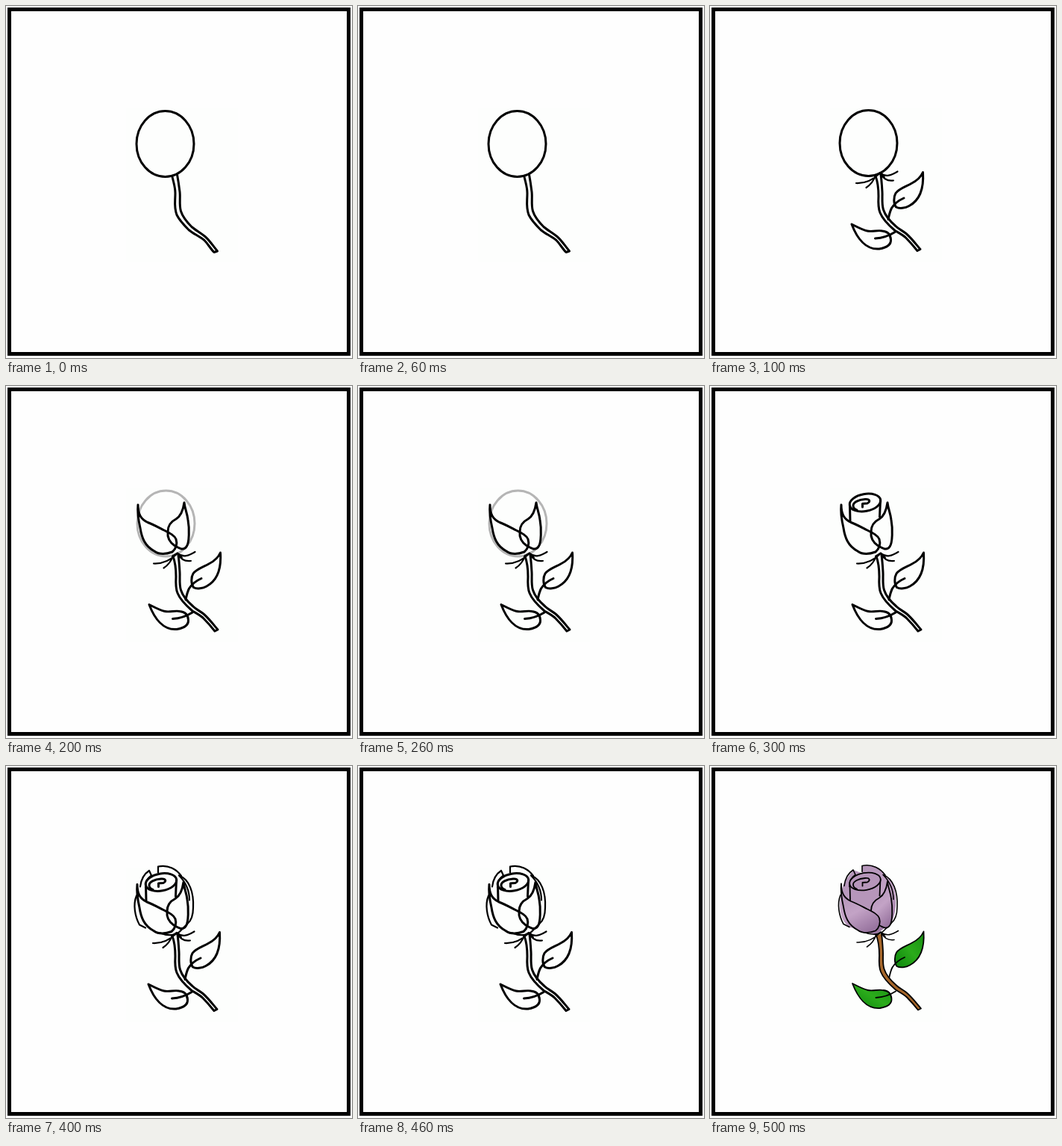
An HTML page that plays this animation: 464 px wide and 471 px high, repeating every 600 ms.

```html
<!DOCTYPE html>
<html lang="en">
<head>
<meta charset="utf-8">
<title>Balloon to rose</title>
<style>
  html, body { margin: 0; width: 100%; height: 100%; overflow: hidden; background: #fefefe; }
  svg { display: block; }
  #art { fill: none; stroke: #000; stroke-width: 3; stroke-linejoin: round; stroke-linecap: round; }
  .thin { stroke-width: 2.2; }
  .faded { stroke: #b5b5b5; }
  #art.painted { stroke-width: 1.8; }
  .painted .thin { stroke-width: 1.6; }
  .painted .leaf { fill: url(#green); }
  .painted .stem { fill: #a5662a; }
  .painted .petal { fill: url(#lilac); }
  .painted .bud { fill: #b696ba; }
</style>
</head>
<body>
<svg width="464" height="471">
  <defs>
    <linearGradient id="lilac" x1=".2" y1="0" x2=".65" y2="1">
      <stop offset="0" stop-color="#b192b6"/>
      <stop offset=".55" stop-color="#c3a3c6"/>
      <stop offset="1" stop-color="#98749f"/>
    </linearGradient>
    <linearGradient id="green" x1="0" y1="1" x2="1" y2="0">
      <stop offset="0" stop-color="#0b850c"/>
      <stop offset=".5" stop-color="#2bab1b"/>
      <stop offset="1" stop-color="#178f12"/>
    </linearGradient>
  </defs>
  <rect x="4.5" y="4.5" width="455" height="461" fill="none" stroke="#000" stroke-width="5"/>
  <rect x="161" y="136" width="150" height="207" fill="#fdfefd"/>
  <g id="art">
    <ellipse id="balloon" data-from="0" data-to="2" cx="213.5" cy="184" rx="38.5" ry="44"/>
    <path data-from="0" data-to="0" d="M223 228C225 237 227 242 227 250C227 262 225 268 229 279C233 287 239 293 245 299C252 305 259 307 266 313C271 318 274 324 279 329L283.500 327.500C278 321 273 313 267 308C261 303 255 300 249 295C243 289 237 282 234.500 274C232 266 234 256 233 248C232 240 231 233 229.500 225"/>

    <g data-from="1">
      <path class="leaf" d="M286.500 223C283 231 277 235 271 238C264 242 254 245 250 251C247 256 247 265 250.500 269.500C255 272 263 271 268 268C283 260 288 245 286.500 223Z"/>
      <path class="leaf" d="M191 292.500C198 296 205 300 212 301.500C219 303 226 300 232 301.500C239 302 243 306 243.500 313C244 320 237 324 228 325.500C210 327 198 311 191 292.500Z"/>
      <path d="M261 257.500C253 261 247 267 244.500 271C242 276 241 281 240 286M222.500 311.500C232 311 241 308 249 303"/>
      <path class="stem" d="M223 228C226 236 227 246 227 255C226.500 264 226.500 271 229 277C233 287 242 295 249 301C254 304 260 307 264 311C270 317 275 323 279 328L283 326C277 319 271 311 264 305C259 301 254 299 250 295C243 289 236 281 233.500 273C231 265 232.500 256 232 249C231.500 240 231 233 230 226"/>
      <path class="thin" d="M229 224C218 235 208 238 197 237.500M223 227C220 236 216 240 210.500 243.500M229 224C237 230 244 227 252.500 222M230 225C234 233 240 235 247 234M222 228L229 223.500L235 230"/>
    </g>

    <g data-from="4" class="thin">
      <path class="petal" stroke="none" d="M180 157L192 140.500L204 145V135.500C220 132 230 138 235 148C250 155 254 190 243 212L222 227L187 217C172 207 171 182 180 157Z"/>
      <path d="M204 143V135C218 132 229 139 235 147.500"/>
      <path d="M180 162C181 153 185 145 192 140.500L195 147C188 152 187 156 187 163"/>
      <path d="M232 147C246 152 252 170 251 190C251 201 248 208 243 212M232 147C242 157 246 168 246 180"/>
      <path d="M175 174C170 186 173 202 179 213L187 217"/>
      <path d="M207 224C216 228 228 228 234 221L243 212"/>
    </g>

    <g data-from="3">
      <path class="bud" d="M187.500 160L188 182L217 194L228 175L228.500 153" stroke="none"/>
      <path d="M187.500 160L188 181M228.500 153L227.500 175"/>
      <ellipse class="bud" cx="208" cy="156" rx="21" ry="11.500" transform="rotate(-10 208 156)"/>
      <path d="M204.500 162V157.500L211 157C215 155 215 151 208 151.500C199 152 192 156 192 160C192 163 194 165 197 166"/>
    </g>

    <g data-from="2">
      <path class="petal" d="M238 156C236 170 232 175 227 178C219 182 216 188 216 195C215 204 220 210 225 213.500C231 217 237 221 241 215C245 210 245 190 243 179C242 170 239 165 238 156Z"/>
      <path class="petal" d="M176 159C176 172 180 178 189 182.500C196 185 205 190 211 193C219 197 225 200 227 205C229 211 227 218 222 222C214 225 205 226 198 221C185 214 181 203 179 190C176 177 175 168 176 159Z"/>
    </g>
  </g>
</svg>
<script>
  const art = document.getElementById("art");
  const balloon = document.getElementById("balloon");
  const parts = art.querySelectorAll("[data-from]");
  const shifts = [[0, 0.5], [-1, -0.5], [1, 0], [0, 0], [0, -0.5], [0, -1.5]];
  const stepTime = 100;

  function draw(now) {
    const step = Math.floor(now / stepTime) % shifts.length;
    for (const part of parts) {
      const { from, to = 5 } = part.dataset;
      part.style.display = step >= from && step <= to ? "" : "none";
    }
    art.setAttribute("transform", `translate(${shifts[step]})`);
    art.classList.toggle("painted", step === 5);
    balloon.classList.toggle("faded", step === 2);
  }

  let start;
  function tick(now) {
    start ??= now;
    draw(now - start);
    requestAnimationFrame(tick);
  }
  draw(0);
  requestAnimationFrame(tick);
</script>
</body>
</html>
```
